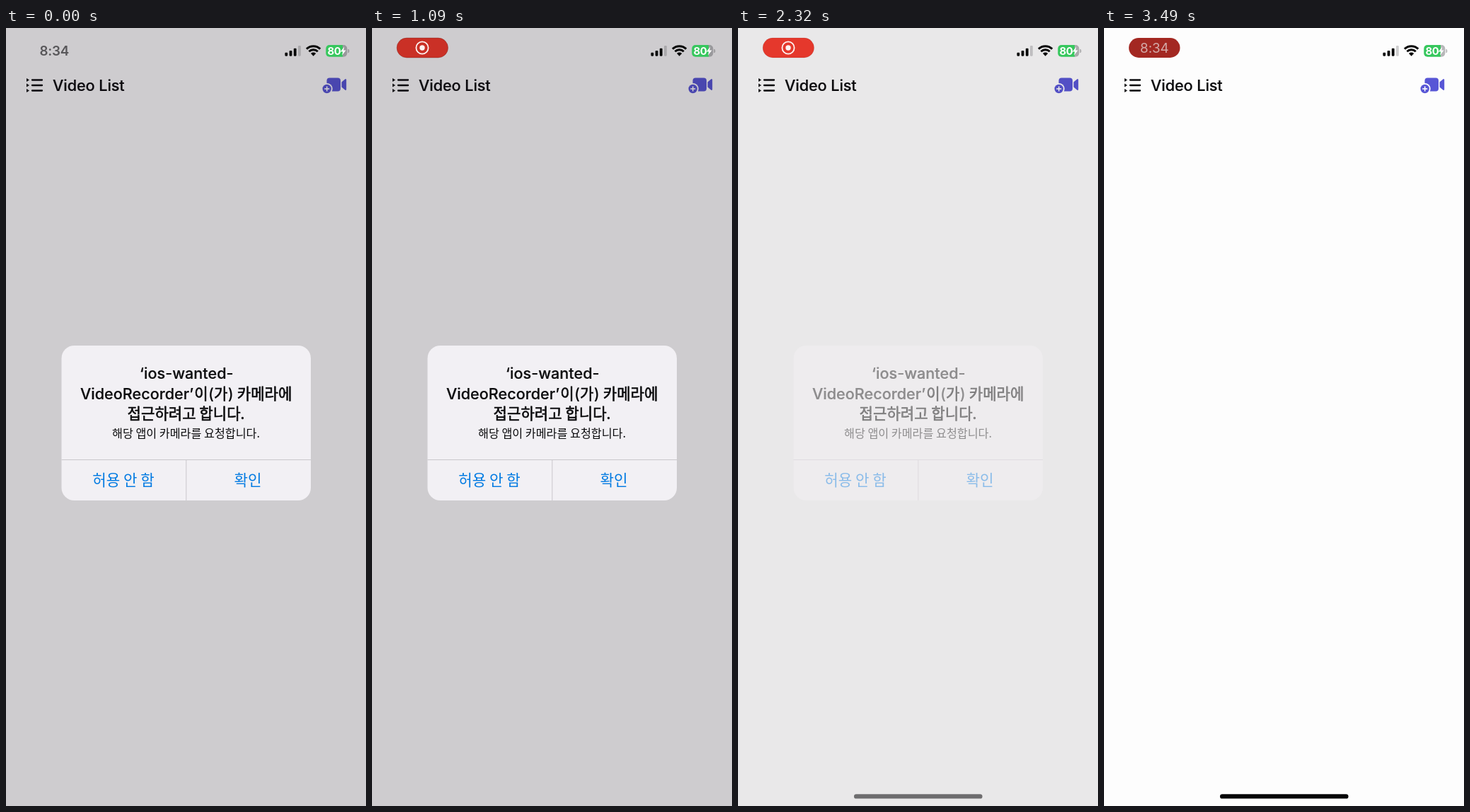
Write an HTML page with a canvas that moves like this. It is 509 by 1100 pixels and loops after 3530 ms.

```html
<!DOCTYPE html>
<html lang="ko">
<head>
<meta charset="utf-8">
<title>Video List</title>
<style>
html, body { margin: 0; width: 100%; height: 100%; overflow: hidden; background: #fdfdfd; }
canvas { display: block; width: 509px; height: 1100px; }
</style>
</head>
<body>
<canvas id="stage"></canvas>
<script>
const W = 509, H = 1100, LOOP = 3530;
const LATIN = 'Inter, sans-serif';
const HANGUL = '"Noto Sans CJK KR", "Noto Sans CJK", sans-serif';
const canvas = document.getElementById('stage');
const ctx = canvas.getContext('2d');
const dpr = window.devicePixelRatio || 1;
canvas.width = W * dpr;
canvas.height = H * dpr;

const clamp = v => Math.max(0, Math.min(1, v));
const ramp = (t, a, b) => clamp((t - a) / (b - a));

// Critically damped spring from 0 to 1.
function spring(t, start, end) {
  if (t <= start) return 0;
  if (t >= end) return 1;
  const x = (t - start) * 0.0121;
  return 1 - (1 + x) * Math.exp(-x);
}

function rounded(x, y, w, h, r, fill) {
  ctx.beginPath();
  ctx.roundRect(x, y, w, h, r);
  ctx.fillStyle = fill;
  ctx.fill();
}

function disc(x, y, r, fill) {
  ctx.beginPath();
  ctx.arc(x, y, r, 0, Math.PI * 2);
  ctx.fillStyle = fill;
  ctx.fill();
}

function polygon(points, fill) {
  ctx.beginPath();
  points.forEach(([x, y]) => ctx.lineTo(x, y));
  ctx.closePath();
  ctx.fillStyle = fill;
  ctx.fill();
}

function line(x1, y1, x2, y2, width, color) {
  ctx.beginPath();
  ctx.moveTo(x1, y1);
  ctx.lineTo(x2, y2);
  ctx.lineWidth = width;
  ctx.strokeStyle = color;
  ctx.stroke();
}

function label(text, x, y, font, color, { align = 'left', spacing = 0, bolder = 0 } = {}) {
  ctx.font = font;
  ctx.textAlign = align;
  ctx.letterSpacing = spacing + 'px';
  ctx.fillStyle = color;
  ctx.fillText(text, x, y);
  if (bolder) {
    ctx.lineWidth = bolder;
    ctx.lineJoin = 'round';
    ctx.strokeStyle = color;
    ctx.strokeText(text, x, y);
  }
}

function drawHeader() {
  ctx.lineCap = 'round';
  for (const y of [73.5, 81, 88.5]) {
    line(37, y, 51, y, 2.3, '#0a0a0c');
    polygon([[29, y - 2.5], [33, y], [29, y + 2.5]], '#0a0a0c');
  }
  ctx.lineCap = 'butt';
  label('Video List', 66, 89, `500 21.7px ${LATIN}`, '#0a0a0c', { spacing: -0.1, bolder: 0.2 });

  const purple = '#5856d6';
  rounded(453.5, 70.5, 19.5, 19, 4, purple);
  ctx.beginPath();
  ctx.moveTo(474.5, 76.5);
  ctx.lineTo(479.2, 72.4);
  ctx.quadraticCurveTo(481.2, 71.2, 481.2, 73.5);
  ctx.lineTo(481.2, 86.5);
  ctx.quadraticCurveTo(481.2, 88.8, 479.2, 87.6);
  ctx.lineTo(474.5, 83.5);
  ctx.fillStyle = purple;
  ctx.fill();
  disc(453.7, 86, 8, '#fdfdfd');
  disc(453.7, 86, 6.2, purple);
  line(450.2, 86, 457.2, 86, 1.6, '#fdfdfd');
  line(453.7, 82.5, 453.7, 89.5, 1.6, '#fdfdfd');
}

function drawStatus() {
  [5, 7.8, 11, 14.8].forEach((h, i) =>
    rounded(394.4 + i * 6.2, 39.7 - h, 3.8, h, 1.1, i < 3 ? '#060606' : 'rgba(40,40,45,.22)'));

  const up = -Math.PI / 2, half = 0.76;
  ctx.strokeStyle = '#060606';
  ctx.lineWidth = 3;
  for (const r of [14, 9]) {
    ctx.beginPath();
    ctx.arc(434.6, 39.8, r, up - half, up + half);
    ctx.stroke();
  }
  ctx.beginPath();
  ctx.moveTo(434.6, 39.8);
  ctx.arc(434.6, 39.8, 5.2, up - half, up + half);
  ctx.fillStyle = '#060606';
  ctx.fill();

  const grey = 'rgba(60,60,65,.36)';
  ctx.save();
  ctx.beginPath();
  ctx.roundRect(452.3, 24, 30, 16.8, 5);
  ctx.clip();
  ctx.fillStyle = '#36c75d';
  ctx.fillRect(452, 24, 24, 17);
  ctx.fillStyle = grey;
  ctx.fillRect(476, 24, 7, 17);
  ctx.restore();
  rounded(483.4, 29.8, 1.9, 5.4, [0, 2, 2, 0], grey);
  label('80', 454.5, 37.8, `700 14.8px ${LATIN}`, '#fff', { spacing: -0.4 });
  polygon([[478.3, 26.6], [472.8, 33.6], [476.2, 33.6], [475, 38.8], [480.6, 31.6], [477.2, 31.6]], '#fff');
}

const pillColors = [
  [0, 226, 58, 46], [390, 226, 58, 46], [470, 202, 48, 38], [1870, 202, 48, 38],
  [2040, 230, 56, 43], [2650, 227, 55, 46], [3040, 227, 55, 46], [3490, 163, 40, 34], [LOOP, 163, 40, 34]
];

function pillColor(t) {
  const i = pillColors.findIndex((k, n) => n > 0 && t <= k[0]);
  const a = pillColors[i - 1], b = pillColors[i];
  const p = ramp(t, a[0], b[0]);
  return `rgb(${[1, 2, 3].map(c => Math.round(a[c] + (b[c] - a[c]) * p))})`;
}

function drawClock(t, dim) {
  ctx.globalAlpha = 1 - ramp(t, 30, 200);
  label('8:34', 68.2, 39.4, `600 18.8px ${LATIN}`, '#58575a', { align: 'center', spacing: -0.3 });

  const grow = spring(t, 30, 470);
  const shown = ramp(t, 30, 260);
  ctx.save();
  ctx.translate(71.3, 28);
  ctx.scale(0.6 + 0.4 * grow, 0.6 + 0.4 * grow);
  ctx.globalAlpha = shown;
  rounded(-36.2, -13.9, 72.4, 27.8, 13.9, pillColor(t));
  ctx.globalAlpha = shown * dim * 0.5;
  ctx.lineWidth = 0.9;
  ctx.strokeStyle = '#84231c';
  ctx.stroke();

  ctx.globalAlpha = shown * (1 - ramp(t, 3040, 3260)) * (0.82 + 0.18 * grow);
  ctx.beginPath();
  ctx.arc(-0.3, 0, 8.6, 0, Math.PI * 2);
  ctx.lineWidth = 1.8;
  ctx.strokeStyle = '#fdf3f2';
  ctx.stroke();
  disc(-0.3, 0, 3.7, '#fdf3f2');

  ctx.globalAlpha = ramp(t, 3180, 3490);
  label('8:34', 0, 6.6, `400 18.8px ${LATIN}`, '#d3aaa8', { align: 'center', spacing: -0.1 });
  ctx.restore();
  ctx.globalAlpha = 1;
}

function drawAlert(alpha) {
  const ink = '#0b0b0d', blue = '#007ae2', rule = '#c9c7cb';
  const latin = `500 21.6px ${LATIN}`;
  const title = `400 21.1px ${HANGUL}`;
  const center = { align: 'center' };
  const heavy = { bolder: 0.6 };

  ctx.globalAlpha = alpha;
  rounded(78.5, 449, 352.5, 219, 18, '#f2f0f4');
  line(78.5, 610.5, 431, 610.5, 1, rule);
  line(254.8, 611, 254.8, 668, 1, rule);

  label('‘ios-wanted-', 255.3, 496, latin, ink, { align: 'center', bolder: 0.2 });
  label('VideoRecorder’', 105, 525, latin, ink, { bolder: 0.2 });
  label('이', 266.3, 525, title, ink, heavy);
  label('(', 286, 525, latin, ink);
  label('가', 294, 525, title, ink, heavy);
  label(')', 313.8, 525, latin, ink);
  label('카메라에', 326.8, 525, title, ink, heavy);
  label('접근하려고 합니다.', 254.5, 553, title, ink, { align: 'center', bolder: 0.6 });
  label('해당 앱이 카메라를 요청합니다.', 254.5, 579, `400 16.2px ${HANGUL}`, ink, center);
  label('허용 안 함', 166, 647.3, `400 21.2px ${HANGUL}`, blue, center);
  label('확인', 342, 647.3, `400 21.2px ${HANGUL}`, blue, center);
  ctx.globalAlpha = 1;
}

function draw(t) {
  const dim = 1 - spring(t, 2160, 2650);
  ctx.setTransform(dpr, 0, 0, dpr, 0, 0);
  ctx.fillStyle = '#fdfdfd';
  ctx.fillRect(0, 0, W, H);
  drawHeader();

  ctx.globalAlpha = 0.2 * dim;
  ctx.fillStyle = 'rgb(18,8,23)';
  ctx.fillRect(0, 0, W, H);
  ctx.globalAlpha = 1;

  drawStatus();
  drawClock(t, dim);
  if (dim > 0) drawAlert(dim);

  ctx.globalAlpha = spring(t, 2170, 2650);
  rounded(164, 1083.2, 181.5, 6.4, 3.2, '#060608');
  ctx.globalAlpha = 1;
}

const begin = performance.now();
function tick() {
  draw((performance.now() - begin) % LOOP);
  requestAnimationFrame(tick);
}
tick();
</script>
</body>
</html>
```
